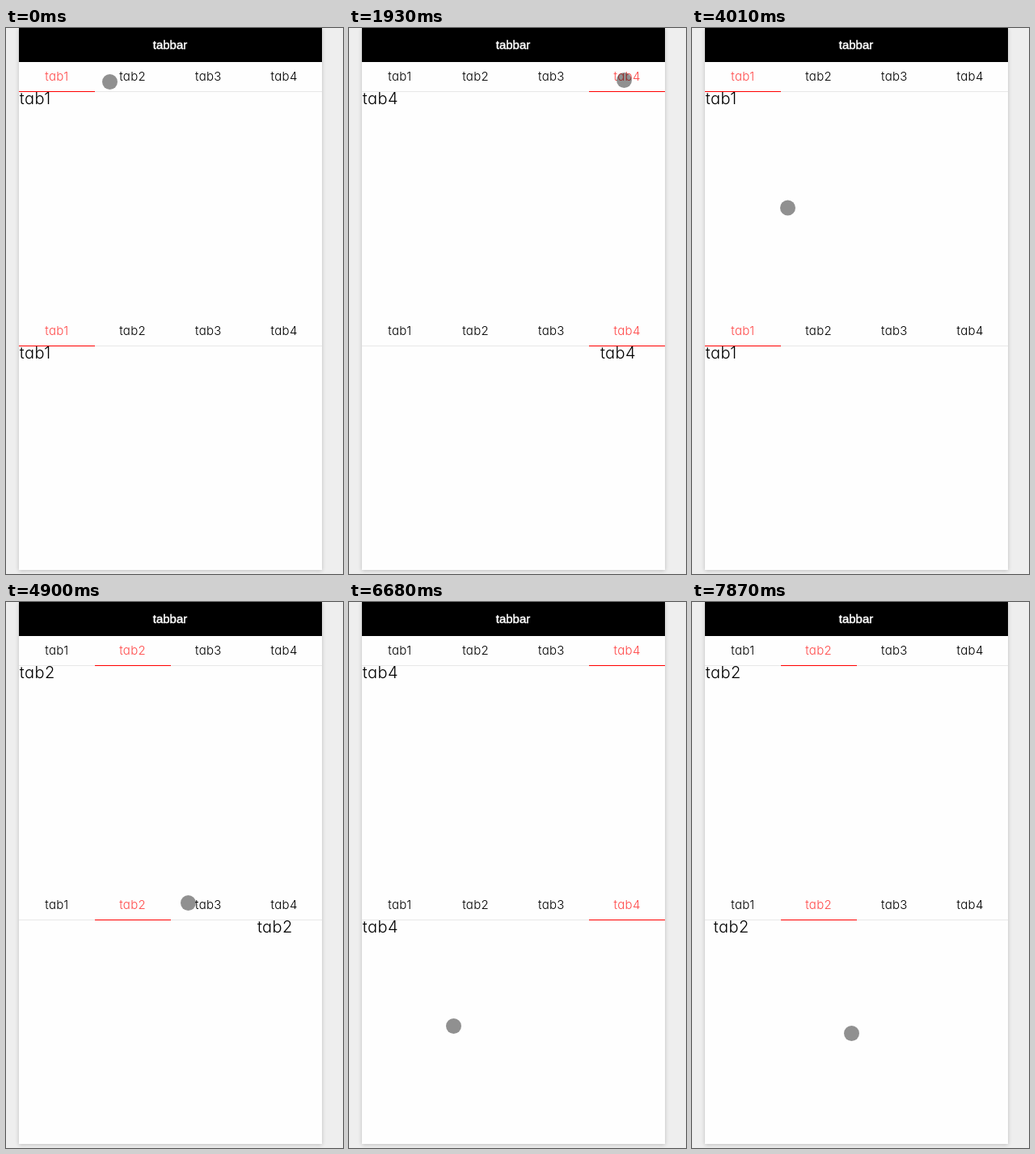
These frames come from a looping animation (417 px wide and 674 px high, 8000 ms). An HTML page:

```html
<!DOCTYPE html>
<html lang="en">
<head>
<meta charset="utf-8">
<title>tabbar</title>
<style>
  html, body { margin: 0; width: 100%; height: 100%; overflow: hidden; background: #eee; }
  .phone {
    position: absolute; left: 16px; top: 0; width: 375px; height: 669px;
    background: #fefefe; box-shadow: 0 1px 5px rgba(0, 0, 0, .2);
  }
  svg { position: absolute; left: 0; top: 0; }
  text { font-family: Inter, sans-serif; font-weight: 300; font-feature-settings: "cv11"; letter-spacing: .02em; }
  .title {
    font: 15px "Liberation Sans", Arial, sans-serif; letter-spacing: 0;
    fill: #fff; stroke: #fff; stroke-width: .45px; text-anchor: middle;
  }
  .tab { font-size: 15px; text-anchor: middle; }
  .tab.on { fill: #ff4b4b; }
  .page { font-size: 20px; }
</style>
</head>
<body>
<div class="phone"></div>
<svg id="stage" width="417" height="674" viewBox="0 0 417 674">
  <clipPath id="screen"><rect x="16" width="375" height="669"/></clipPath>
  <rect x="16" width="375" height="42"/>
  <text class="title" x="203" y="26">tabbar</text>
</svg>
<script>
const LOOP = 8000, BEAT = 148.5, LEAD = 12;
const LEFT = 16, WIDTH = 375, COUNT = 4, TAB = WIDTH / COUNT;
const SLIDE = 1.6, SLIDE_LEAD = .183;

// Where the pointer is at each beat. "rest" beats are spent waiting there beforehand,
// "open" selects a tab on arrival, "drag" pulls the lower pager along on the way.
const gestures = [
  { beat: 0, x: 128, y: 66, open: 0 },
  { beat: 5, x: 137, y: 66, rest: 2, open: 1 },
  { beat: 7, x: 254, y: 63 },
  { beat: 8, x: 254, y: 63, open: 2 },
  { beat: 13, x: 340, y: 64, rest: 2, open: 3 },
  { beat: 17, x: 64, y: 66, rest: 2, open: 0 },
  { beat: 23, x: 64, y: 66 },
  { beat: 32, x: 172, y: 377, rest: 1 },
  { beat: 33, x: 225, y: 371, open: 1 },
  { beat: 36, x: 255, y: 374, open: 2 },
  { beat: 40, x: 332, y: 374, open: 3 },
  { beat: 45, x: 129, y: 523 },
  { beat: 47, x: 270, y: 548, drag: true, open: 2 },
  { beat: 49, x: 160, y: 538 },
  { beat: 51, x: 270, y: 540, drag: true, open: 1 },
  { beat: 52, x: 187, y: 532 },
  { beat: 53, x: 197, y: 532, drag: true }
];

const stage = document.getElementById("stage");
function add(parent, name, attrs, label = "") {
  const node = document.createElementNS("http://www.w3.org/2000/svg", name);
  for (const key in attrs) node.setAttribute(key, attrs[key]);
  node.textContent = label;
  return parent.appendChild(node);
}

function makePanel(top) {
  const group = add(stage, "g", { transform: `translate(0 ${top})`, "shape-rendering": "crispEdges" });
  add(group, "rect", { x: LEFT, y: 36, width: WIDTH, height: 1, fill: "#e8e8e8" });
  const line = add(group, "rect", { y: 36, width: 94, height: 1, fill: "#f00" });
  const tabs = Array.from({ length: COUNT }, (_, i) =>
    add(group, "text", { x: LEFT + TAB * (i + .5), y: 22.5, class: "tab" }, `tab${i + 1}`));
  const view = add(stage, "g", { "clip-path": "url(#screen)" });
  const pages = tabs.map(tab => add(view, "text", { y: top + 52, class: "page" }, tab.textContent));
  return (active, position) => {
    line.setAttribute("x", Math.round(LEFT + TAB * active));
    tabs.forEach((tab, i) => tab.classList.toggle("on", i === active));
    pages.forEach((page, i) => page.setAttribute("x", LEFT + .8 + (i - position) * WIDTH));
  };
}

const showTop = makePanel(42), showBottom = makePanel(356);
const cursor = add(stage, "circle", { r: 9.5, fill: "rgba(0,0,0,.43)" });

const mix = (a, b, k) => a + (b - a) * k;
const easeOut = k => 1 - (1 - Math.min(k, 1)) ** 2;

function stateAt(beat) {
  let active = 0, from = 0, opened = -SLIDE, pull = 0, previous = gestures[0];
  let { x, y } = previous;
  for (const next of gestures) {
    const span = next.beat - (next.rest || 0) - previous.beat;
    const k = span > 0 ? Math.min(1, Math.max(0, (beat - previous.beat) / span)) : 1;
    x = mix(previous.x, next.x, k);
    y = mix(previous.y, next.y, k);
    pull = next.drag ? (x - previous.x) / WIDTH : 0;
    if (next.beat > beat) break;
    if (next.open !== undefined) {
      from = active - pull;
      active = next.open;
      opened = next.beat;
      pull = 0;
    }
    previous = next;
  }
  const position = mix(from, active, easeOut((beat - opened + SLIDE_LEAD) / SLIDE)) - pull;
  return { x, y, active, position };
}

function draw(time) {
  const { x, y, active, position } = stateAt(Math.floor((time % LOOP + LEAD) / BEAT));
  showTop(active, active);
  showBottom(active, position);
  cursor.setAttribute("cx", x + .5);
  cursor.setAttribute("cy", y + .5);
}

const begin = performance.now();
function tick() {
  draw(performance.now() - begin);
  requestAnimationFrame(tick);
}
tick();
</script>
</body>
</html>
```
